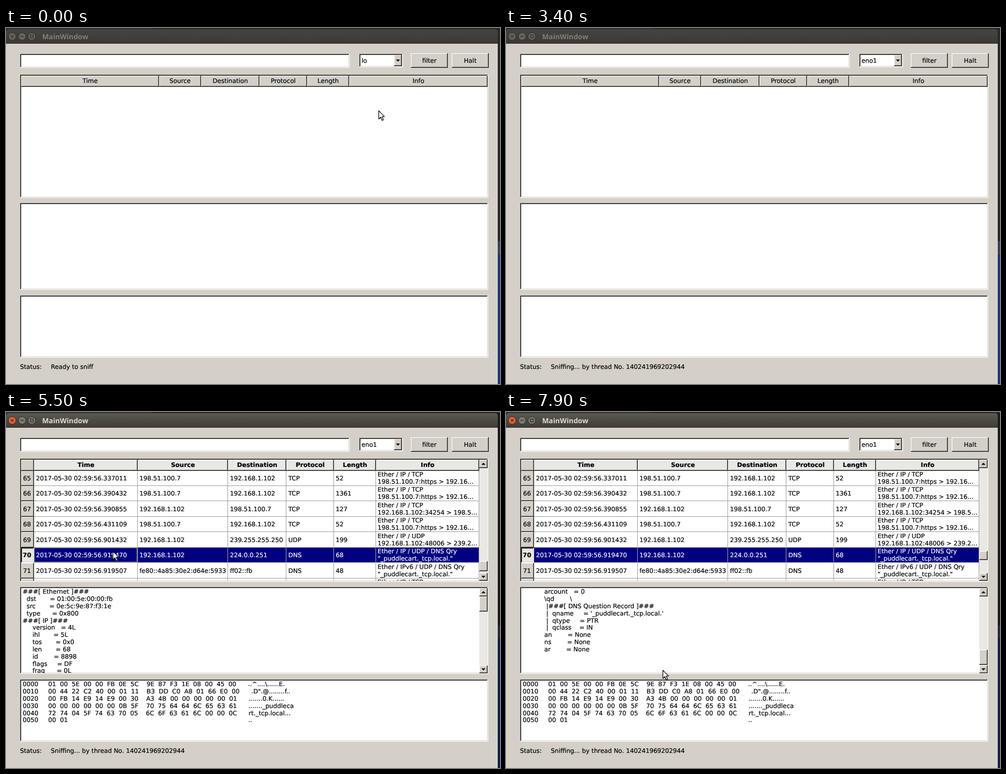
These frames come from a looping animation (881 by 635 pixels, 8 s). An HTML page with a canvas:

```html
<!DOCTYPE html>
<html lang="en">
<head>
<meta charset="utf-8">
<title>Packet viewer</title>
<style>
html, body { margin: 0; width: 100%; height: 100%; overflow: hidden; background: #d4d0c8; }
canvas { display: block; width: 881px; height: 635px; }
</style>
</head>
<body>
<canvas id="stage" width="881" height="635"></canvas>
<script>
const ctx = document.getElementById('stage').getContext('2d');
const LOOP = 8000, STEP = 100;
const FACE = '#d4d0c8', NAVY = '#000080', LIT = '#eae8e4', GRID = '#a3a19e';
const FONT = '"DejaVu Sans", Verdana, sans-serif';
const ROW = 27.5, LINE = 12.83, PANE_X = 29.8;
const SERVICE = '_puddlecart._tcp.local.';

const HOSTS = {
  me: '192.168.1.102', web: '203.0.113.21', tls: '198.51.100.7',
  mc: '224.0.0.251', ssdp: '239.255.255.250',
  me6: 'fe80::4a85:30e2:d64e:5933', mc6: 'ff02::fb'
};

// seconds, from, to, protocol, length, service or local port
const PACKETS = {
  53: '55.904554 web me TCP 1500 http',
  54: '55.904800 web me TCP 2477 http',
  55: '55.904806 me web TCP 52 41118',
  56: '55.918584 me mc DNS 68',
  57: '55.918651 me6 mc6 DNS 48',
  58: '55.919037 me mc DNS 68',
  59: '55.919072 me6 mc6 DNS 48',
  65: '56.337011 tls me TCP 52 https',
  66: '56.390432 tls me TCP 1361 https',
  67: '56.390855 me tls TCP 127 34254',
  68: '56.431109 tls me TCP 52 https',
  69: '56.901432 me ssdp UDP 199 48006',
  70: '56.919470 me mc DNS 68',
  71: '56.919507 me6 mc6 DNS 48'
};

const HEADS = ['Time', 'Source', 'Destination', 'Protocol', 'Length', 'Info'];
const WIDE = [27, 273, 348, 452, 536.5, 611.5, 859];
const NARROW = [50, 234.5, 396, 500, 584.5, 659.5, 844];

const field = (depth, list) => list.split(',').map(pair => {
  const [key, value] = pair.split('=');
  return ' '.repeat(depth) + key.padEnd(10) + '= ' + value;
});
const DETAILS = [
  '###[ Ethernet ]###',
  ...field(2, 'dst=01:00:5e:00:00:fb,src=0e:5c:9e:87:f3:1e,type=0x800'),
  '###[ IP ]###',
  ...field(5, 'version=4L,ihl=5L,tos=0x0,len=68,id=8898,flags=DF,frag=0L,ttl=1,proto=udp,' +
    'chksum=0xb3dd,src=192.168.1.102,dst=224.0.0.251'),
  '     \\options   \\',
  '###[ UDP ]###',
  ...field(8, 'sport=mdns,dport=mdns,len=48,chksum=0xa34b'),
  '###[ DNS ]###',
  ...field(11, 'id=0,qr=0L,opcode=QUERY,aa=0L,tc=0L,rd=0L,ra=0L,z=0L,ad=0L,cd=0L,rcode=ok,' +
    'qdcount=1,ancount=0,nscount=0,arcount=0'),
  '           \\qd        \\',
  '            |###[ DNS Question Record ]###',
  ...field(2, `qname='${SERVICE}',qtype=PTR,qclass=IN`).map(s => ' '.repeat(12) + '|' + s),
  ...field(11, 'an=None,ns=None,ar=None')
];

const DUMP = [
  '01005E0000FB0E5C9E87F31E08004500',
  '004422C240000111B3DDC0A80166E000',
  '00FB14E914E90030A34B000000000001',
  '0000000000000B5F707564646C656361',
  '7274045F746370056C6F63616C00000C',
  '0001'
].map((hex, i) => {
  const bytes = hex.match(/../g);
  const chars = bytes.map(b => {
    const n = parseInt(b, 16);
    return n > 31 && n < 127 ? String.fromCharCode(n) : '.';
  });
  while (bytes.length < 16) bytes.push('    ');
  const half = k => bytes.slice(k, k + 8).join('  ');
  return `00${i}0     ${half(0)}    ${half(8)}      ${chars.join('')}`;
});

// pointer path: time, x, y
const PATH = [
  [100, 664, 147], [600, 672, 49], [700, 672, 49], [900, 677, 72], [1000, 677, 72],
  [1200, 683, 90], [1400, 683, 90], [1800, 745, 64], [1900, 745, 64], [2400, 204, 182],
  [4800, 318, 163], [5300, 190, 248], [5500, 190, 248], [6300, 259, 399],
  [6600, 259, 399], [7500, 262, 446], [7900, 279, 460]
];
// packets captured so far: time, count
const COUNTS = [
  [0, 0], [3700, 45], [3900, 59], [4200, 64], [4300, 68], [4800, 71], [5500, 72],
  [5700, 74], [6000, 76], [6200, 78], [6700, 79], [7000, 80], [7400, 81]
];

function rect(x, y, w, h, color) {
  ctx.fillStyle = color;
  ctx.fillRect(x, y, w, h);
}

function text(s, x, y, color = '#000', align = 'left', bold = false) {
  ctx.font = (bold ? 'bold ' : '') + '11px ' + FONT;
  ctx.textAlign = align;
  ctx.fillStyle = ctx.strokeStyle = color;
  ctx.fillText(s, x, y);
  // slight emboldening, as screen-hinted type looks
  ctx.lineWidth = 0.2;
  ctx.strokeText(s, x, y);
}

function edge(x, y, w, h, topLeft, bottomRight) {
  rect(x, y, w, 1, topLeft);
  rect(x, y, 1, h, topLeft);
  rect(x, y + h - 1, w, 1, bottomRight);
  rect(x + w - 1, y, 1, h, bottomRight);
}

function raised(x, y, w, h, fill = FACE) {
  rect(x, y, w, h, fill);
  edge(x + 1, y + 1, w - 2, h - 2, fill, '#8a8780');
  edge(x, y, w, h, '#fff', '#1c1c1c');
}

function pressed(x, y, w, h) {
  rect(x, y, w, h, LIT);
  edge(x + 1, y + 1, w - 2, h - 2, '#8a8780', FACE);
  edge(x, y, w, h, '#111', '#fff');
}

function sunken(x, y, w, h) {
  rect(x, y, w, h, '#fff');
  edge(x + 1, y + 1, w - 2, h - 2, '#111', FACE);
  edge(x, y, w, h, '#807d77', '#fff');
}

function dotted(x, y, w, h, color) {
  ctx.strokeStyle = color;
  ctx.lineWidth = 1;
  ctx.setLineDash([1, 1]);
  ctx.strokeRect(x + 0.5, y + 0.5, w - 1, h - 1);
  ctx.setLineDash([]);
}

function clipped(x, y, w, h, draw) {
  ctx.save();
  ctx.beginPath();
  ctx.rect(x, y, w, h);
  ctx.clip();
  draw();
  ctx.restore();
}

function triangle(x, y, dir) {
  ctx.fillStyle = '#000';
  ctx.beginPath();
  ctx.moveTo(x - 3.7, y - 1.8 * dir);
  ctx.lineTo(x + 3.7, y - 1.8 * dir);
  ctx.lineTo(x, y + 2 * dir);
  ctx.fill();
}

function scrollbar(top, bottom, thumbY, thumbH) {
  rect(844, top, 15, bottom - top, LIT);
  raised(844, top, 15, 15);
  triangle(851.5, top + 7.5, -1);
  raised(844, bottom - 14, 15, 14);
  triangle(851.5, bottom - 7, 1);
  raised(844, Math.round(thumbY), 15, Math.round(thumbH));
}

function titleButton(x, kind, active) {
  const hot = kind === 'close' && active;
  ctx.beginPath();
  ctx.arc(x, 15, 6.7, 0, 7);
  ctx.fillStyle = hot ? '#ee6034' : active ? '#7d7a70' : '#66645c';
  ctx.fill();
  ctx.strokeStyle = '#2f2e2a';
  ctx.lineWidth = 1;
  ctx.stroke();
  ctx.strokeStyle = hot ? '#4a2114' : '#34332f';
  ctx.lineWidth = 1.3;
  ctx.beginPath();
  if (kind === 'close') {
    ctx.moveTo(x - 2.4, 12.6); ctx.lineTo(x + 2.4, 17.4);
    ctx.moveTo(x + 2.4, 12.6); ctx.lineTo(x - 2.4, 17.4);
  } else if (kind === 'min') {
    ctx.moveTo(x - 3, 15); ctx.lineTo(x + 3, 15);
  } else {
    ctx.rect(x - 2.5, 12.5, 5, 5);
  }
  ctx.stroke();
}

function drawShell(active) {
  rect(0, 0, 881, 635, FACE);
  rect(0, 0, 881, 28, '#262523');
  rect(0, 0, 262, 2, '#2d2e36');
  const bar = ctx.createLinearGradient(0, 2, 0, 28);
  bar.addColorStop(0, active ? '#5b594f' : '#464540');
  bar.addColorStop(1, active ? '#3e3d38' : '#3a3935');
  ctx.fillStyle = bar;
  ctx.beginPath();
  ctx.roundRect(0, 2, 877, 25.5, [5, 5, 0, 0]);
  ctx.fill();
  rect(877, 2, 4, 378, active ? '#1b1a19' : '#292826');
  rect(877, 380, 4, 24, active ? '#252836' : '#3a4058');
  rect(877, 404, 4, 231, active ? '#101f47' : '#1d3775');
  titleButton(11, 'close', active);
  titleButton(28.7, 'min', active);
  titleButton(46, 'max', active);
  ctx.font = 'bold 12.6px "Open Sans", "Noto Sans", sans-serif';
  ctx.textAlign = 'left';
  ctx.fillStyle = active ? '#dfdbd2' : '#817e78';
  ctx.fillText('MainWindow', 64.5, 20);
}

function drawControls(t) {
  sunken(25, 46, 588, 25);
  sunken(630, 46, 78, 24);
  const focused = t >= 800 && t < 1800;
  if (focused) {
    rect(633, 49, 58, 19, NAVY);
    dotted(633, 49, 58, 19, '#ffff7f');
  }
  text(t < 1400 ? 'lo' : 'eno1', 634, 61.7, focused ? '#fff' : '#000');
  raised(692, 48, 14, 20);
  triangle(699, 58, 1);
  raised(722, 45, 66, 26);
  text('filter', 755, 61.5, '#000', 'center');
  if (t >= 1800 && t < 3400) dotted(726, 49, 58, 18, '#333');
  raised(795, 45, 66, 26);
  text('Halt', 828, 61.5, '#000', 'center');
  text('Status:', 25, 607.6);
  text(t < 1800 ? 'Ready to sniff' : 'Sniffing... by thread No. 140241969202944', 80, 607.6);
}

function packet(i) {
  const spare = `${(i < 53 ? 55.9 + (i - 53) * 0.0087 : 56 + (i - 60) * 0.0871).toFixed(6)} ` +
    `${i < 60 ? 'web me TCP 1500 http' : 'tls me TCP 52 https'}`;
  const [sec, from, to, proto, len, port] = (PACKETS[i] || spare).split(' ');
  const src = HOSTS[from], dst = HOSTS[to];
  const ip = from === 'me6' ? 'IPv6' : 'IP';
  const info = proto === 'DNS'
    ? [`Ether / ${ip} / UDP / DNS Qry`, `"${SERVICE}"`]
    : [`Ether / IP / ${proto}`, `${src}:${port} > ${dst}`.slice(0, port === 'http' ? 28 : 27) + '…'];
  return { cells: ['2017-05-30 02:59:' + sec, src, dst, proto, len], info };
}

function drawRow(i, y, picked, focused) {
  const { cells, info } = packet(i);
  const ink = picked ? '#fff' : '#000';
  const top = Math.round(y), h = Math.round(y + ROW) - top;
  if (picked) rect(50, top, 794, h, NAVY);
  cells.forEach((s, c) => text(s, NARROW[c] + 3.5, y + 17.5, ink));
  text(info[0], 662.8, y + 10.8, ink);
  text(info[1], 662.8, y + 23.6, ink);
  rect(50, top + h - 1, 794, 1, GRID);
  for (const x of NARROW.slice(1)) rect(Math.round(x) - 1, top, 1, h, GRID);
  if (focused) dotted(50, top, 184, h - 1, '#ffff7f');
  (picked ? pressed : raised)(27, top, 23, h);
  text(i, 37.4, y + 17.7, '#000', 'center', picked);
}

function drawTable(t, count) {
  const picked = t >= 5500;
  const cols = count ? NARROW : WIDE;
  sunken(25, 83, 835, 220);
  if (count) {
    clipped(27, 104, 817, 197, () => {
      const top = picked ? 65 : count - 6;
      const y0 = picked ? 104 : 301 - 7 * ROW;
      for (let i = top - 1; i <= Math.min(count, top + 7); i++) {
        const hit = picked && i === 70;
        drawRow(i, y0 + (i - top) * ROW, hit, hit && t < 6500);
      }
    });
    raised(27, 85, 23, 20);
  }
  HEADS.forEach((name, c) => {
    const x = Math.round(cols[c]), w = Math.round(cols[c + 1]) - x;
    raised(x, 85, w, 20, picked ? LIT : FACE);
    text(name, x + w / 2, 98, '#000', 'center', picked);
  });
  if (count) {
    const h = 187 * 7 / count;
    const first = picked ? 64 : count - 7;
    scrollbar(85, 301, 100 + (187 - h) * first / (count - 7), h);
  }
}

function drawPanes(t) {
  sunken(25, 312, 835, 155);
  sunken(25, 477, 835, 111);
  if (t < 5500) return;
  const turns = Math.max(0, (t - 6600) / STEP);
  const scroll = Math.min(38, 3 * Math.round(1.6 * turns));
  clipped(27, 314, 817, 152, () => {
    DETAILS.forEach((s, i) => text(s, PANE_X, 324.2 + (i - scroll) * LINE));
    if (t >= 6500) {
      const x = PANE_X + ctx.measureText(DETAILS[6]).width;
      rect(Math.round(x), 314 + (6 - scroll) * LINE, 1, LINE, '#000');
    }
  });
  scrollbar(314, 466, 329 + 95 * scroll / 38, 27);
  DUMP.forEach((s, i) => text(s, PANE_X, 489.2 + i * LINE));
}

function drawPopup(t) {
  if (t < 900 || t > 1400) return;
  const second = t >= 1200;
  ctx.save();
  ctx.globalAlpha = t < 1400 ? 1 : 0.8;
  ctx.shadowColor = 'rgba(0,0,0,.28)';
  ctx.shadowBlur = 22;
  ctx.shadowOffsetY = 12;
  rect(631, 69, 77, 30, '#fff');
  ctx.shadowColor = 'transparent';
  const y = second ? 84 : 71;
  rect(632, y, 75, 13, NAVY);
  dotted(632, y, 75, 13, '#ffff7f');
  edge(631, 69, 77, 30, '#333', '#333');
  text('lo', 635, 81.6, second ? '#000' : '#fff');
  text('eno1', 635, 94.6, second ? '#fff' : '#000');
  ctx.restore();
}

function drawPointer(t) {
  if (t >= 3400 && t < 4800) return;
  let k = PATH.length - 1;
  while (k > 0 && PATH[k][0] > t) k--;
  const a = PATH[k], b = PATH[k + 1] || a;
  let [, x, y] = a;
  // parked until the window is left
  if (b !== a && t > a[0] && a[0] !== 2400) {
    const p = (t - a[0]) / (b[0] - a[0]);
    const e = p * p * (3 - 2 * p);
    x += (b[1] - x) * e;
    y += (b[2] - y) * e;
  }
  ctx.save();
  ctx.translate(x + 0.8, y + 0.6);
  ctx.beginPath();
  [[0, 0], [0, 14.6], [3.4, 11.4], [5.9, 17.2], [8.3, 16.2], [5.8, 10.6], [10, 10.3]]
    .forEach(([px, py]) => ctx.lineTo(px, py));
  ctx.closePath();
  ctx.shadowColor = 'rgba(0,0,0,.3)';
  ctx.shadowBlur = 2;
  ctx.shadowOffsetY = 1;
  ctx.fillStyle = '#fff';
  ctx.fill();
  ctx.shadowColor = 'transparent';
  ctx.strokeStyle = '#111';
  ctx.lineWidth = 1.2;
  ctx.stroke();
  ctx.restore();
}

function render(ms) {
  const t = Math.floor((ms % LOOP) / STEP) * STEP;
  const count = COUNTS.filter(c => c[0] <= t).pop()[1];
  ctx.textRendering = 'geometricPrecision';
  ctx.lineJoin = 'round';
  drawShell((t >= 800 && t < 3400) || t >= 5500);
  drawControls(t);
  drawTable(t, count);
  drawPanes(t);
  drawPopup(t);
  drawPointer(t);
}

const start = performance.now();
function tick() {
  render(performance.now() - start);
  requestAnimationFrame(tick);
}
tick();
</script>
</body>
</html>
```
